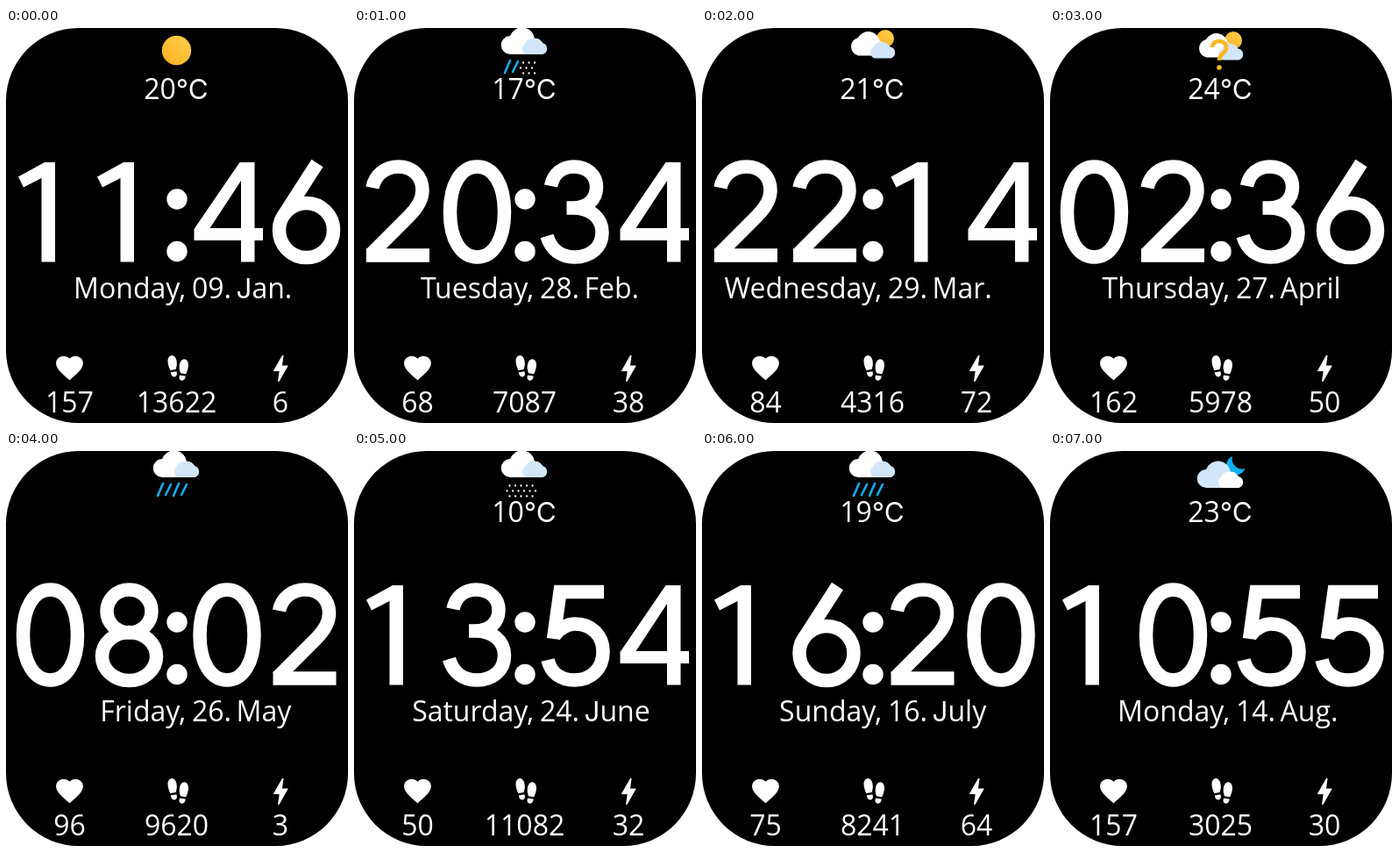
Animation of 390x450 px, one loop 8000 ms. Source, as an HTML page:

```html
<!DOCTYPE html>
<html lang="en">
<head>
<meta charset="utf-8">
<title>Watch face</title>
<style>
  html, body { margin: 0; width: 100%; height: 100%; overflow: hidden; background: #fff; }
  svg { display: block; width: 390px; height: 450px; }
  text { font: 32px "Open Sans", "Noto Sans", sans-serif; fill: #fff; }
  .wide { font: 31.4px Inter, sans-serif; }
  .mid { text-anchor: middle; }
  .end { text-anchor: end; }
</style>
</head>
<body>
<svg viewBox="0 0 390 450">
  <defs>
    <linearGradient id="sunFill" x1="1" y1="0" x2="0" y2="1">
      <stop offset="0" stop-color="#ffcf4a"/>
      <stop offset="1" stop-color="#f9b021"/>
    </linearGradient>
  </defs>
  <rect width="390" height="450" rx="83"/>
  <g id="icon"></g>
  <text id="temp" class="mid" x="194" y="81"></text>
  <g id="time" role="img"></g>
  <g fill="#fff">
    <circle cx="195" cy="195" r="11.7"/>
    <circle cx="195" cy="254.5" r="11.7"/>
  </g>
  <text id="weekday" class="end" x="205" y="308"></text>
  <text id="day" x="212" y="308"></text>
  <text id="month" x="262.5" y="308"></text>
  <g fill="#fff">
    <path transform="translate(54 369.2) scale(1.54 1.5)" d="M12 21.35l-1.45-1.32C5.4 15.36 2 12.28 2 8.5 2 5.42 4.42 3 7.5 3c1.74 0 3.41.81 4.5 2.09C13.09 3.81 14.76 3 16.5 3 19.58 3 22 5.42 22 8.5c0 3.78-3.4 6.86-8.55 11.54L12 21.35z"/>
    <g transform="translate(184.5 373) scale(.94)">
      <path id="foot" d="M5 0C9 0 11 5 11 10C11 13 10 15 9.5 17L3 18C1.5 15 0 11 0 7C0 3 2 0 5 0ZM3.5 20.5L10.5 19.5C12 23 10.5 26 8 26C5 26 4 24 3.5 20.5Z"/>
      <use href="#foot" transform="matrix(-1 0 0 1 25 4.5)"/>
    </g>
    <path transform="translate(293.5 368) scale(1.65)" d="M11 21h-1l1-7H7.5c-.58 0-.57-.32-.38-.66C8.48 10.94 10.42 7.54 13 3h1l-1 7h3.500c.49 0 .56.33.47.51C12.96 17.55 11 21 11 21z"/>
  </g>
  <text id="pulse" class="mid" x="72.5" y="438"></text>
  <text id="steps" class="mid" x="194.5" y="438"></text>
  <text id="power" class="mid" x="313" y="438"></text>
</svg>
<script>
const $ = id => document.getElementById(id);

const states = [
  ['sun', '20°C', '11:46', 'Monday', '09', 'Jan.', 157, 13622, 6],
  ['sleet', '17°C', '20:34', 'Tuesday', '28', 'Feb.', 68, 7087, 38],
  ['partly', '21°C', '22:14', 'Wednesday', '29', 'Mar.', 84, 4316, 72],
  ['unknown', '24°C', '02:36', 'Thursday', '27', 'April', 162, 5978, 50],
  ['rain', '', '08:02', 'Friday', '26', 'May', 96, 9620, 3],
  ['snow', '10°C', '13:54', 'Saturday', '24', 'June', 50, 11082, 32],
  ['rain', '19°C', '16:20', 'Sunday', '16', 'July', 75, 8241, 64],
  ['night', '23°C', '10:55', 'Monday', '14', 'Aug.', 157, 3025, 30]
];

// Centre lines of the large numerals in a 78 by 119 cell
const lines = {
  0: 'M38.5 8C57 8 69.5 28 69.5 59.5S57 111 38.5 111 7.5 91 7.5 59.5 20 8 38.5 8Z',
  2: 'M9 32C12 17 24 8 38.5 8C55 8 66 19 66 35C66 46 60 55 51 64L7 108M2 109H74',
  3: 'M11 30C14 16 24 8 37 8C53 8 63 18 63 31C63 46 52 55 36 55H29M36 55C56 55 69.5 66 69.5 83C69.5 100 56 111 38 111C22 111 11 102 6.5 87',
  5: 'M71.5 10.5H21.5L14 64M14.5 61C21 52 29 47 39 47C57 47 70.5 60 70.5 78.5C70.5 98 57 111 38 111C22 111 11 103 7.500 88',
  6: 'M52.5 4L14 63.8M71 80.5A31 31 0 1 1 9 80.5A31 31 0 1 1 71 80.5Z',
  8: 'M64 32.5A25.5 24.5 0 1 1 13 32.5A25.5 24.5 0 1 1 64 32.5ZM69.5 84A31 27.5 0 1 1 7.5 84A31 27.5 0 1 1 69.5 84Z'
};
const solids = {
  1: 'M44 3V116.500H28.5V21L8 31.5L2 19.5L32 3Z',
  4: 'M53 3H70V78H79.5V92H70V116.5H54.5V92H1V79ZM54.5 78V24L19 78Z'
};
const cells = [12, 102, 213.5, 302.5];

const numeral = (n, i) => {
  const paint = lines[n]
    ? `d="${lines[n]}" fill="none" stroke="#fff" stroke-width="15.5"`
    : `d="${solids[n]}" fill="#fff" fill-rule="evenodd"`;
  return `<path transform="translate(${cells[i]} 150)" ${paint}/>`;
};

const WHITE = '#fff', PALE = '#d2e6fa', BLUE = '#12aef2', GOLD = '#fbb524';
const circle = (x, y, r, fill) => `<circle cx="${x}" cy="${y}" r="${r}" fill="${fill}"/>`;
const path = (d, fill) => `<path d="${d}" fill="${fill}"/>`;
const moved = (y, art) => `<g transform="translate(0 ${y})">${art}</g>`;
const sun = (x, y, r) => circle(x, y, r, 'url(#sunFill)');

const bigCloud = fill =>
  path('M178.5 30A10.5 10.5 0 0 1 178 9A14.5 14.5 0 0 1 206 12A9 9 0 0 1 208 30Z', fill);
const smallCloud = fill =>
  path('M199 30A6.5 6.5 0 0 1 195 18A11 11 0 0 1 214.5 17A6.7 6.7 0 0 1 215.5 30Z', fill);
const clouds = (back, front) => bigCloud(back) + smallCloud(front);

const drops = xs => `<path d="${xs.map((x, i) => `M${x + 6} ${37 + i % 2}l-6 ${14 - 2 * (i % 2)}`).join('')}"
  stroke="${BLUE}" stroke-width="2.6" stroke-linecap="round"/>`;

const flakes = (from, to) => {
  let art = '';
  for (let row = 0; row < 3; row++)
    for (let x = from + (row % 2 ? 0 : 3); x <= to - row; x += 6.5)
      art += circle(x, 39.5 + row * 6, 1.15, WHITE);
  return art;
};

const partlyCloud = sun(209, 14, 10) +
  path('M178.5 33.5A10.5 10.5 0 0 1 178 13A13.5 13.5 0 0 1 203 17A8.5 8.5 0 0 1 204 33.5Z', WHITE) +
  moved(6.5, smallCloud(PALE));
const question = `<path d="M185 22C185 12 202 13 201 23C200.5 29 193 29 193 37"
  fill="none" stroke="${GOLD}" stroke-width="4.6"/>` + circle(193, 45, 2.8, GOLD);
const moon = path('M208 6A11 11 0 1 0 222.5 20A11.5 11.5 0 0 1 208 6Z', BLUE);

const icons = {
  sun: sun(194.5, 25.5, 16.7),
  sleet: clouds(WHITE, PALE) + drops([172, 181]) + flakes(190, 210),
  partly: moved(-2, partlyCloud),
  unknown: partlyCloud + question,
  rain: clouds(WHITE, PALE) + drops([173, 182, 191, 200]),
  snow: clouds(WHITE, PALE) + flakes(174.5, 208),
  night: moon + moved(12, clouds(PALE, WHITE))
};

const widen = (text, part) => text.replace(part, `<tspan class="wide">${part}</tspan>`);

function show([icon, temp, time, weekday, day, month, pulse, steps, power]) {
  $('icon').innerHTML = icons[icon];
  $('time').innerHTML = [...time.replace(':', '')].map(numeral).join('');
  $('time').setAttribute('aria-label', time);
  $('temp').innerHTML = widen(temp, '°C');
  $('month').innerHTML = widen(month, 'J');
  const texts = { weekday: weekday + ',', day: day + '.', pulse, steps, power };
  for (const id in texts) $(id).textContent = texts[id];
}

let current = -1;
function tick() {
  const next = Math.floor(performance.now() / 1000) % states.length;
  if (next !== current) show(states[current = next]);
  requestAnimationFrame(tick);
}
tick();
</script>
</body>
</html>
```
